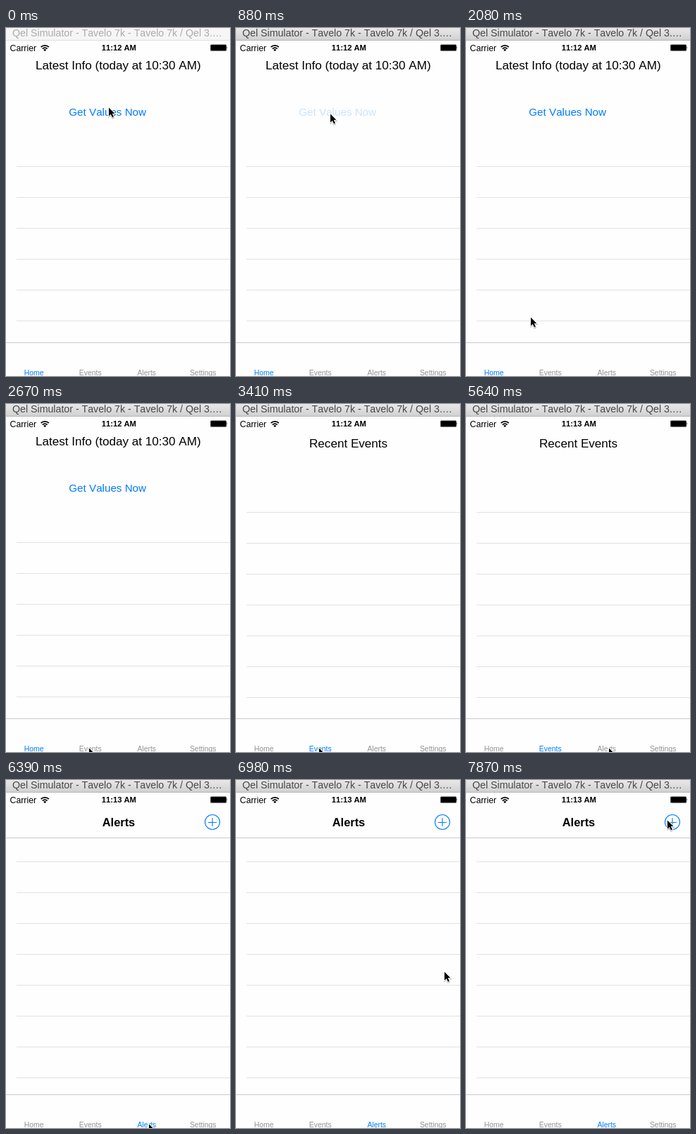
An HTML page for the animation above (8 s loop, 318 by 496 pixels).

```html
<!DOCTYPE html>
<html lang="en">
<head>
<meta charset="utf-8">
<title>Tab bar demo</title>
<style>
  html, body { margin: 0; width: 100%; height: 100%; overflow: hidden; background: #fefefe; }
  svg { display: block; width: 318px; height: 496px; font-family: "Liberation Sans", Arial, sans-serif; }
  text { font-kerning: none; white-space: pre; }
  .row { fill: #e1e1e3; }
  .edge { fill: #cacaca; }
  .tab { font-size: 10.4px; text-anchor: middle; fill: #929292; }
  .tab.on, #button { fill: #007aff; }
  .head { font-size: 17.1px; }
  .bold { font-weight: bold; text-anchor: middle; }
  .line { fill: none; stroke: #007aff; stroke-width: 1.1; }
  #cursor { filter: drop-shadow(0 1px .6px rgba(0, 0, 0, .35)); }
</style>
</head>
<body>
<svg viewBox="0 0 318 496">
  <defs>
    <linearGradient id="metal" x1="0" y1="0" x2="0" y2="1">
      <stop offset="0" stop-color="#e8e8e8"/>
      <stop offset="1" stop-color="#d1d1d1"/>
    </linearGradient>
  </defs>
  <rect width="318" height="496" fill="#fefefe"/>

  <rect id="bar" width="318" height="17"/>
  <rect id="barEdge" y="17" width="318" height="1"/>
  <text id="title" x="9" y="12" font-size="14.2">Qel Simulator - Tavelo 7k - Tavelo 7k / Qel 3.…</text>

  <text x="5.5" y="32.7" font-size="12.3">Carrier</text>
  <g fill="none" stroke="#000" stroke-width="1.7">
    <path d="M49.6 27.2A7.8 7.8 0 0 1 60.8 27.2"/>
    <path d="M51.8 29.6A4.7 4.7 0 0 1 58.6 29.6"/>
  </g>
  <path d="M53.2 31.1A2.8 2.8 0 0 1 57.2 31.1L55.2 33.2Z"/>
  <text id="clock" class="bold" x="160.3" y="32.2" font-size="11.2"></text>
  <rect x="290.3" y="23.8" width="22.6" height="8.8" rx="1.4" stroke="#777" stroke-width=".6"/>
  <path d="M313.6 26.5Q315 28 313.6 29.7Z"/>

  <g id="home">
    <text class="head" x="42" y="59">Latest Info (today at 10:30 AM)</text>
    <text id="button" x="89.3" y="124.6" font-size="15.2">Get Values Now</text>
  </g>
  <g id="events">
    <text class="head" x="104" y="62">Recent Events</text>
  </g>
  <g id="alerts">
    <text class="bold" x="160" y="66" font-size="16.4">Alerts</text>
    <rect class="edge" y="82" width="318" height="1"/>
    <circle class="line" cx="293" cy="60" r="10.5"/>
    <path class="line" d="M287 60.5H299M293 54V66"/>
  </g>

  <rect class="edge" y="448" width="318" height="1"/>
  <g id="tabs"></g>
  <path id="cursor" d="M1 1.6V13.4L3.8 10.9L6 15.6L7.9 14.7L5.8 10.1H9.3Z"
        stroke="#fff" stroke-width="1.8" paint-order="stroke"/>
</svg>
<script>
const LOOP = 8000;
const $ = id => document.getElementById(id);

function add(parent, tag, attrs, label = "") {
  const node = document.createElementNS("http://www.w3.org/2000/svg", tag);
  for (const key in attrs) node.setAttribute(key, attrs[key]);
  node.textContent = label;
  return parent.appendChild(node);
}

// First separator of each page
const pages = { home: 197, events: 154, alerts: 116 };
for (const id in pages) {
  for (let y = pages[id]; y < 440; y += 44) {
    add($(id), "rect", { class: "row", x: 15, y, width: 303, height: 1 });
  }
}

const tabs = ["Home", "Events", "Alerts", "Settings"].map((label, i) =>
  add($("tabs"), "text", { class: "tab", x: 39.7 + i * 80, y: 494.5 }, label));

const linear = u => u;
const easeOut = u => 1 - (1 - u) ** 2;

// Each move bends through `via` and is seen in a few jumps
const origin = [145, 112];
const moves = [
  { from: 140, to: 290, steps: 2, via: [139, 117], end: [133, 121] },
  { from: 1630, to: 1780, steps: 2, via: [121, 205], end: [105, 307] },
  { from: 2080, to: 2670, steps: 5, via: [71, 481], end: [117, 489], ease: easeOut },
  { from: 4160, to: 4460, steps: 3, via: [121, 380], end: [131, 303] },
  { from: 4760, to: 5640, steps: 7, via: [147, 426], end: [202, 489] },
  { from: 6680, to: 7130, steps: 4, via: [314, 467], end: [293, 118] },
  { from: 7430, to: 7870, steps: 4, via: [282, 6], end: [285, 56] }
];

// Number of jumps made by time t: 1 at `from`, all of them at `to`
function jumps(t, { from, to, steps }) {
  if (t < from) return 0;
  const gap = (to - from) / (steps - 1);
  return Math.min(steps, 1 + Math.floor((t - from) / gap + 1e-6));
}

const bend = (a, b, c, u) => (1 - u) ** 2 * a + 2 * u * (1 - u) * b + u * u * c;

function pointer(t) {
  let pos = origin;
  for (const move of moves) {
    const { steps, via, end, ease = linear } = move;
    const u = ease(jumps(t, move) / steps);
    if (u === 0) break;
    pos = pos.map((p, i) => Math.round(bend(p, via[i], end[i], u)));
  }
  return pos;
}

const fade = { from: 880, to: 1330, steps: 4 };

function buttonOpacity(t) {
  const k = jumps(t, fade);
  return k ? 0.2 + 0.8 * (k - 1) / (fade.steps - 1) : 1;
}

function draw(t) {
  $("cursor").setAttribute("transform", `translate(${pointer(t)})`);
  $("button").setAttribute("opacity", buttonOpacity(t));
  $("clock").textContent = t < 5050 ? "11:12 AM" : "11:13 AM";

  const open = t < 3410 ? 0 : t < 6390 ? 1 : 2;
  Object.keys(pages).forEach((id, i) => { $(id).style.display = i === open ? "" : "none"; });
  tabs.forEach((tab, i) => tab.classList.toggle("on", i === open));

  const active = t >= fade.from;
  $("bar").setAttribute("fill", active ? "url(#metal)" : "#f6f6f6");
  $("barEdge").setAttribute("fill", active ? "#b4b4b4" : "#dedede");
  $("title").setAttribute("fill", active ? "#474747" : "#ababab");
}

const start = performance.now();
function tick() {
  draw((performance.now() - start) % LOOP);
  requestAnimationFrame(tick);
}
tick();
</script>
</body>
</html>
```
